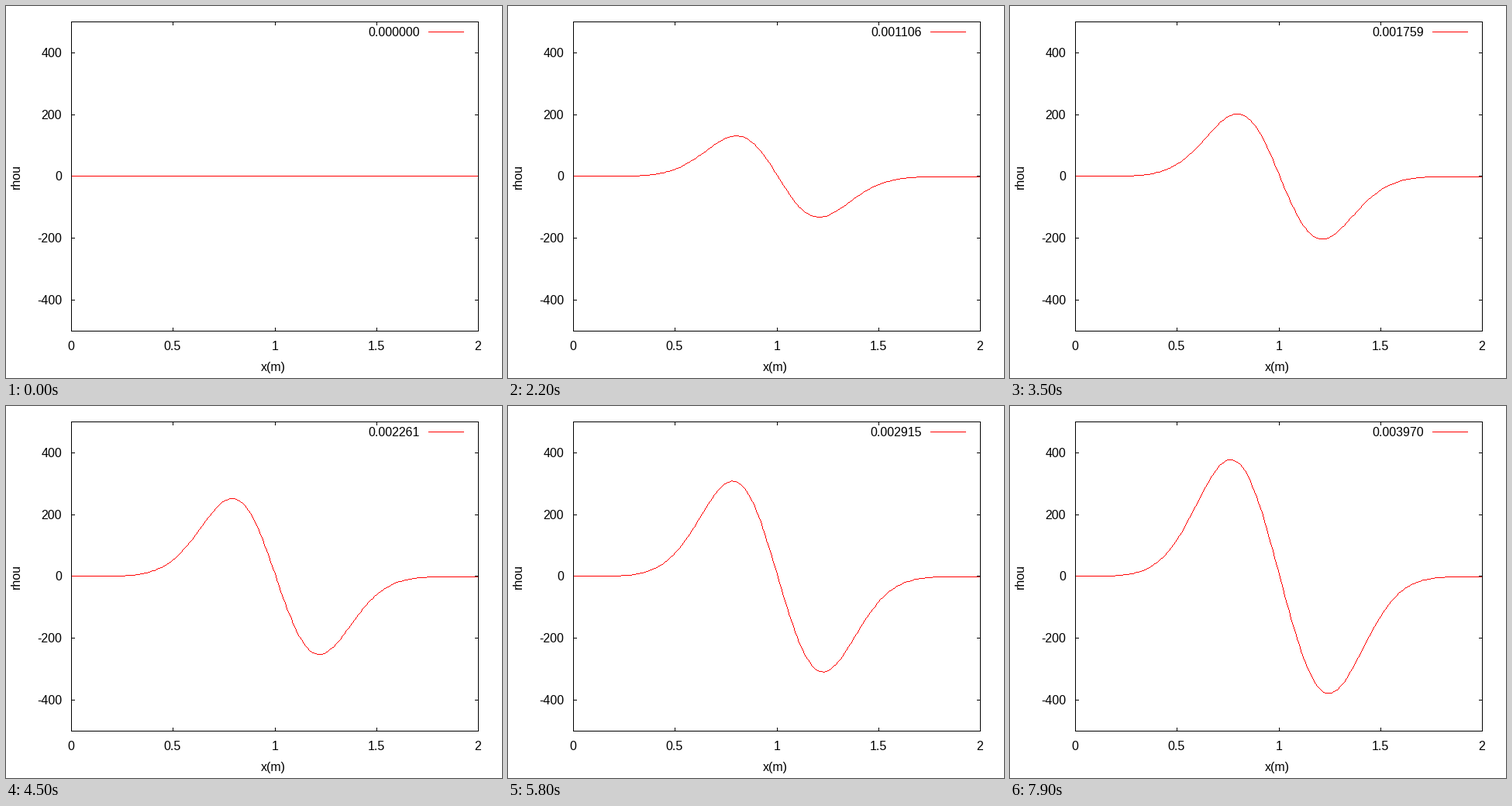
A matplotlib script for the animation above (8 s loop, 640 by 480 pixels).

```python
import numpy as np
import matplotlib.pyplot as plt
from matplotlib.animation import FuncAnimation

W, H, DPI = 640, 480, 100
FRAMES, INTERVAL = 80, 100
DT = 0.01 / 199
LEFT, RIGHT, TOP, BOTTOM, ZERO = 84, 609, 20, 419, 219
TIC = 5
RED, BLACK = (255, 0, 0), (0, 0, 0)
X = np.linspace(0, 2, 201)
CENTRE = 1.004

X_TICS = {84: "0", 215: "0.5", 347: "1", 478: "1.5", 609: "2"}
Y_TICS = {60: "400", 140: "200", 219: "0", 299: "-200", 379: "-400"}


def momentum(n):
    """Height of the wave in pixels at step n."""
    s = n / (FRAMES - 1)
    peak = 191.6 * s - 48.8 * s**3 + 8.0 * s**5
    width = 0.2 + 0.0405 * s**2
    power = 2 + 0.23 * s**2
    r = np.abs(X - CENTRE) / width
    return np.sign(CENTRE - X) * peak * r * np.exp((1 - r**power) / power)


def trace(img, cols, rows):
    """Draw a hard-edged one pixel polyline."""
    for x0, y0, x1, y1 in zip(cols, rows, cols[1:], rows[1:]):
        steps = max(abs(x1 - x0), abs(y1 - y0)) + 1
        xs = np.floor(np.linspace(x0, x1, steps) + 0.5).astype(int)
        ys = np.floor(np.linspace(y0, y1, steps) + 0.5).astype(int)
        img[ys, xs] = RED


def draw_border(img):
    img[[TOP, BOTTOM], LEFT:RIGHT + 1] = BLACK
    img[TOP:BOTTOM + 1, [LEFT, RIGHT]] = BLACK
    for x in X_TICS:
        img[TOP:TOP + TIC, x] = BLACK
        img[BOTTOM - TIC + 1:BOTTOM + 1, x] = BLACK
    for y in Y_TICS:
        img[y, LEFT:LEFT + TIC] = BLACK
        img[y, RIGHT - TIC + 1:RIGHT + 1] = BLACK


def render(n):
    img = np.full((H, W, 3), 255, np.uint8)
    draw_border(img)
    cols = np.floor(LEFT + X * (RIGHT - LEFT) / 2 + 0.5).astype(int)
    rows = ZERO - np.floor(momentum(n)).astype(int)
    trace(img, cols, rows)
    img[33, 545:591] = RED
    img[TOP:BOTTOM + 1, [LEFT, RIGHT]] = BLACK
    return img


fig = plt.figure(figsize=(W / DPI, H / DPI), dpi=DPI, facecolor="white")
ax = fig.add_axes([0, 0, 1, 1])
ax.axis("off")
picture = ax.imshow(render(0), extent=(0, W, H, 0), aspect="auto",
                    interpolation="nearest")
ax.set_xlim(0, W)
ax.set_ylim(H, 0)


def label(x, y, text, ha="center", **kw):
    return ax.text(x, y, text, ha=ha, va="baseline", color="black",
                   family="Liberation Sans", fontsize=16 * 72 / DPI, **kw)


for x, text in X_TICS.items():
    label(x, 444, text)
for y, text in Y_TICS.items():
    label(72, y + 6, text, ha="right")
label(344.5, 471, "x(m)")
label(18, 219.5, "rhou", rotation=90, rotation_mode="anchor")
clock = label(533.5, 39, "0.000000", ha="right")


def update(n):
    picture.set_data(render(n))
    clock.set_text(f"{n * DT:.6f}")
    return picture, clock


anim = FuncAnimation(fig, update, frames=FRAMES, interval=INTERVAL,
                     repeat=True, repeat_delay=0, blit=False)
plt.show()
```
